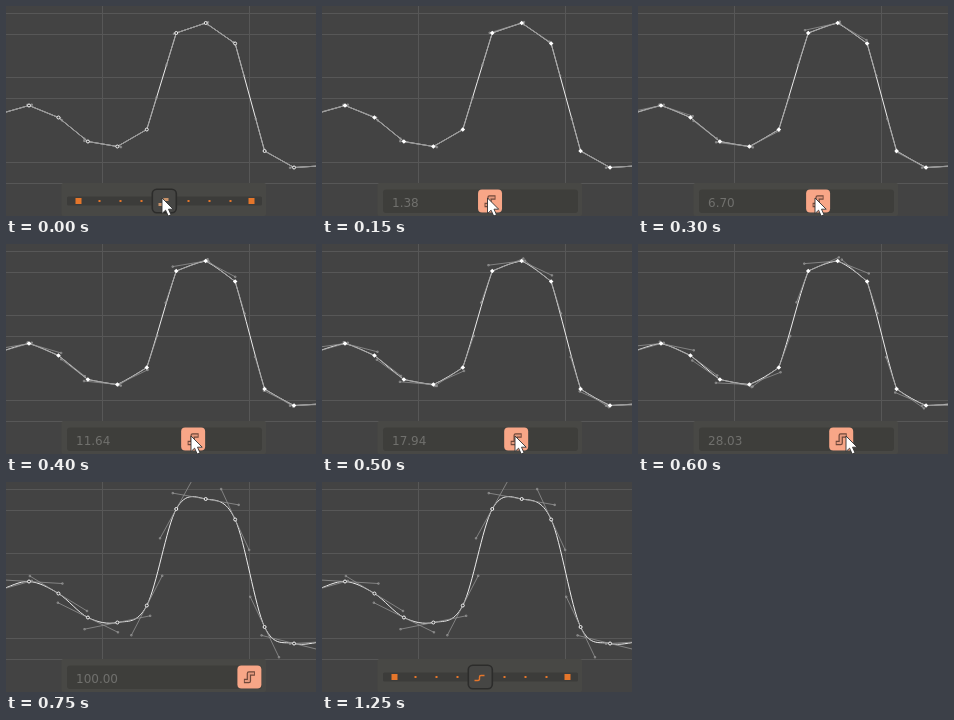
Write an HTML page that moves like this. It is 310 px wide and 210 px high and loops after 1.4 s.

```html
<!DOCTYPE html>
<html lang="en">
<head>
<meta charset="utf-8">
<title>Tangent blend slider</title>
<style>
html, body { margin: 0; width: 100%; height: 100%; overflow: hidden; background: #434343; }
svg { display: block; width: 310px; height: 210px; }
text { font: 12px "DejaVu Sans", Verdana, sans-serif; fill: #70706d; }
path { fill: none; }
</style>
</head>
<body>
<svg viewBox="0 0 310 210">
  <rect width="310" height="210" fill="#434343"/>
  <path id="grid" stroke="#575757"/>
  <path id="curve" stroke="#ececec"/>
  <path id="arms" stroke="#929292" stroke-width=".8"/>
  <path id="tips" fill="none" stroke="#989898" stroke-width=".8"/>
  <path id="solid" style="fill:#fff"/>
  <path id="hollow" style="fill:#434343" stroke="#f4f4f4"/>

  <rect x="55.5" y="177" width="204.5" height="33" rx="2" fill="#484845"/>
  <g id="rest">
    <rect x="61" y="190.5" width="195" height="9" rx="1.5" fill="#3c3c3a"/>
    <path id="marks" style="fill:#e5762b"/>
    <rect x="146.3" y="183.3" width="24" height="23.4" rx="4.5" fill="#464644" stroke="#2c2c2b" stroke-width="1.6"/>
    <g transform="translate(158 195)">
      <path id="icon" d="M-5.5 3.5H-2Q-.5 3.5 -.5 2V0Q-.5 -1.5 1 -1.5H4.5"/>
    </g>
  </g>
  <g id="drag">
    <rect x="61" y="183.5" width="195" height="23.5" rx="3" fill="#3e3e3b"/>
    <text id="value" x="70" y="200.5"></text>
    <g id="knob">
      <rect x="-12" y="-11.5" width="24" height="23" rx="4" fill="#f8a687"/>
      <path d="M-5.5 4H-.5V-3.5H5.5" stroke="#70483a" stroke-width="4.4" stroke-linejoin="round"/>
      <path d="M-4.6 4H-.5V-3.5H4.6" stroke="#e59a7e" stroke-width="2" stroke-linejoin="round"/>
    </g>
  </g>
  <path id="cursor" d="M0 0V15.5L3.6 12.2L6.2 18L9 16.8L6.5 11.2H11.2Z" style="fill:#fff" stroke="#333" stroke-width=".9"/>
</svg>
<script>
const $ = id => document.getElementById(id);
const LOOP = 1400, STEP = 50, GAP = 29.45, ARM = 33.5;
const STEEP = 9; // vertical scale in which tangent angles are blended
const ys = [116, 107.9, 99.5, 111.5, 135.5, 140.5, 123.5, 27, 17, 37.5, 145, 161.5, 159.7, 157.9];
const xAt = i => 23 + (i - 2) * GAP;

// [ms, knob travel, cursor x]
const moves = [
  [100, .06, 160], [150, .1175, 165.5], [300, .2588, 177], [500, .4236, 193],
  [600, .5294, 208], [650, .65, 226], [700, .83, 252], [750, 1, 330]
];

function track(ms, col) {
  const i = moves.findIndex(m => m[0] >= ms);
  if (i < 0) return moves[moves.length - 1][col];
  if (i === 0) return moves[0][col];
  const a = moves[i - 1], b = moves[i];
  return a[col] + (b[col] - a[col]) * (ms - a[0]) / (b[0] - a[0]);
}

const chord = i => (ys[i + 1] - ys[i]) / GAP;

function blend(from, to, p) {
  const a = Math.atan(from * STEEP), b = Math.atan(to * STEEP);
  return Math.tan(a + (b - a) * p) / STEEP;
}

function tangents(i, p) {
  const smooth = (ys[i + 1] - ys[i - 1]) / (2 * GAP);
  return [blend(chord(i - 1), smooth, p), blend(chord(i), smooth, p)];
}

const f = n => n.toFixed(2);
const pt = (x, y) => f(x) + ' ' + f(y);
const diamond = (x, y, r) => `M${pt(x - r, y)}l${r} ${-r}l${r} ${r}l${-r} ${r}z`;
const ring = (x, y, r) => `M${pt(x - r, y)}a${r} ${r} 0 1 1 ${2 * r} 0a${r} ${r} 0 1 1 ${-2 * r} 0z`;
const box = (x, y, r) => `M${pt(x - r, y - r)}h${2 * r}v${2 * r}h${-2 * r}z`;

function drawCurve(p, active) {
  let curve = '', arms = '', tips = '', keys = '', last;
  for (let i = 1; i < ys.length - 1; i++) {
    const x = xAt(i), y = ys[i], d = GAP / 3;
    const slopes = tangents(i, p);
    curve += i === 1 ? 'M' + pt(x, y)
      : `C${pt(x - GAP + d, ys[i - 1] + last * d)} ${pt(x - d, y - slopes[0] * d)} ${pt(x, y)}`;
    last = slopes[1];
    slopes.forEach((s, side) => {
      const dx = (side ? ARM : -ARM) / Math.hypot(1, s);
      arms += `M${pt(x, y)}L${pt(x + dx, y + dx * s)}`;
      tips += box(x + dx, y + dx * s, .7);
    });
    keys += active ? diamond(x, y, 2.3) : ring(x, y, 1.5);
  }
  $('curve').setAttribute('d', curve);
  $('arms').setAttribute('d', arms);
  $('tips').setAttribute('d', tips);
  $('solid').setAttribute('d', active ? keys : '');
  $('hollow').setAttribute('d', active ? '' : keys);
}

const show = (id, on) => $(id).style.display = on ? '' : 'none';

function render(time) {
  const ms = Math.floor(time % LOOP / STEEP_MS) * STEEP_MS;
  const before = ms < 100, dragging = !before && ms < 1250;
  const travel = before ? 0 : track(ms, 1);
  const p = travel * travel;
  drawCurve(p, dragging && ms < 750);
  show('rest', !dragging);
  show('drag', dragging);
  show('cursor', ms < 750);
  $('value').textContent = (p * 100).toFixed(2);
  $('knob').setAttribute('transform', `translate(${f(158 + 85.4 * travel)} 195)`);
  $('cursor').setAttribute('transform', `translate(${f(before ? 156 : track(ms, 2))} 192)`);
  $('icon').setAttribute('stroke', before ? '#c9936a' : '#e5762b');
  $('icon').setAttribute('stroke-width', before ? 3 : 1.4);
}

const STEEP_MS = STEP;
$('grid').setAttribute('d',
  [7.5, 28.5, 71.5, 92.5, 156.5, 177.5].map(y => `M0 ${y}H310`).join('') +
  [96.5, 243.5].map(x => `M${x} 0V210`).join(''));
$('marks').setAttribute('d',
  [72.5, 245.5].map(x => box(x, 195, 3)).join('') +
  [93.5, 114.5, 135.5, 182.5, 203.5, 224.5].map(x => box(x, 195, 1)).join(''));

const start = performance.now();
function tick() {
  render(performance.now() - start);
  requestAnimationFrame(tick);
}
tick();
</script>
</body>
</html>
```
